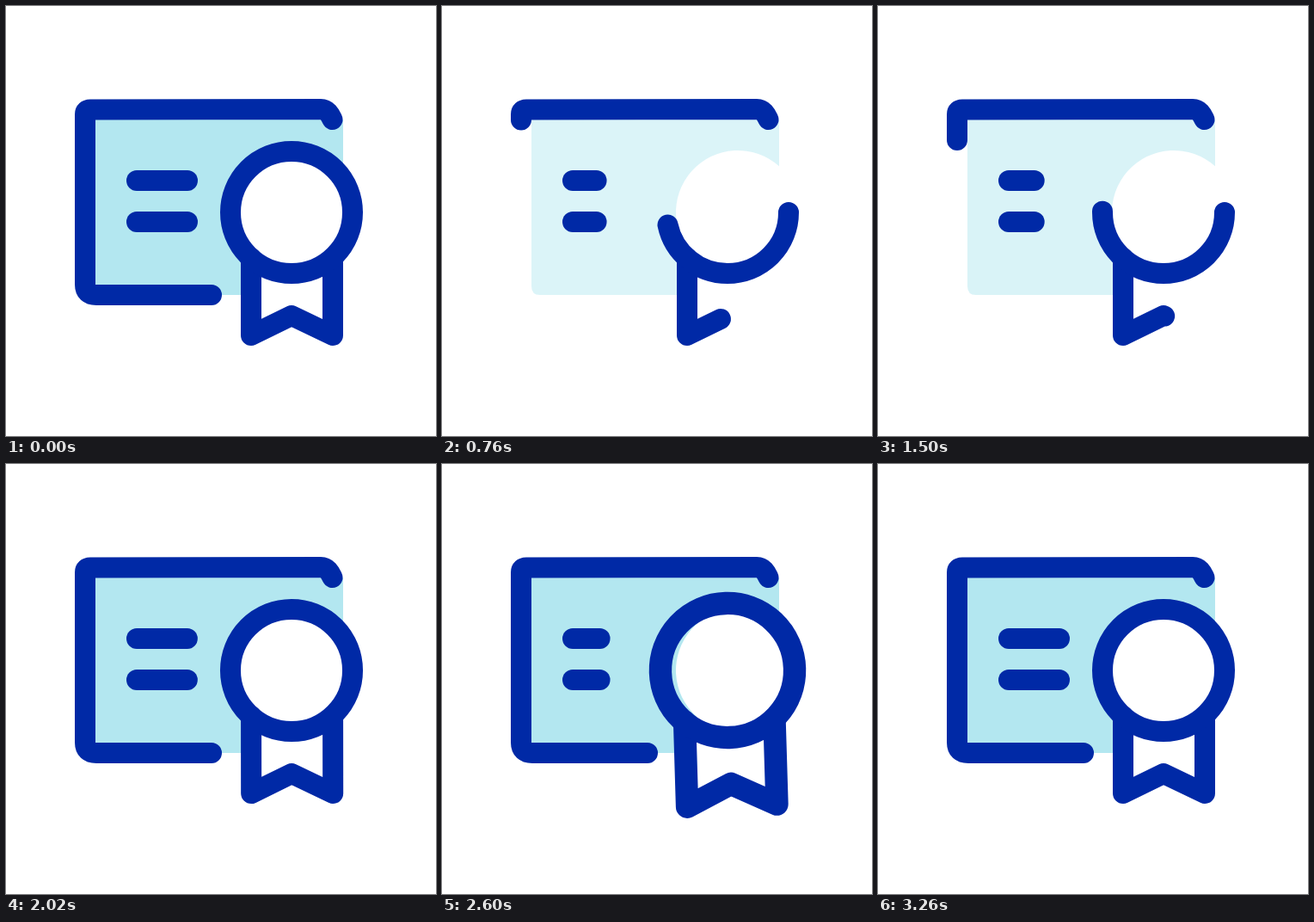
Write an HTML page that moves like this. It is 500 by 500 pixels and loops after 4 s.

```html
<!DOCTYPE html>
<html>
<head>
<meta charset="utf-8">
<style>
  html, body { margin: 0; width: 100%; height: 100%; overflow: hidden; background: #fff; }
  svg { display: block; width: 100%; height: 100%; }
  .ink { fill: none; stroke: #0029a6; stroke-width: 24; stroke-linecap: round; stroke-linejoin: round; }
</style>
</head>
<body>
<svg viewBox="0 0 500 500">
  <path id="paper" fill="#b3e7f0" d="M104 132H392V186.3A72 72 0 1 0 296 293.7V336H114Q104 336 104 326Z"/>
  <g class="ink">
    <path class="trim" pathLength="1" d="M379.5 132C377 127 374 120 366 120L98 120.5Q92 120.5 92 126V324Q92 336 105 336H239"/>
    <path class="line" pathLength="1" d="M152 203H211"/>
    <path class="line" pathLength="1" d="M152 251H211"/>
    <g id="badge">
      <path class="trim" pathLength="1" d="M285 293V383L332 360L380 383V293"/>
      <path class="trim" pathLength="1" d="M403 240A71 71 0 0 1 261 240A71 71 0 0 1 403 240"/>
    </g>
  </g>
</svg>
<script>
const LOOP = 4000;
const paper = document.getElementById('paper');
const badge = document.getElementById('badge');
const trims = document.querySelectorAll('.trim');
const lines = document.querySelectorAll('.line');

// Keyframes as [time, value] pairs, eased in and out
const DRAWN = [[500, 1], [1000, 0], [1250, 0], [1750, 1]];
const LINE = [[2000, 1], [2500, 0.48], [3000, 1]];
const SCALE = [[2000, 1], [2625, 1.1], [3250, 1]];
const SWING = [[2000, 0], [2417, -10], [2833, 10], [3250, 0]];

function valueAt(keys, t) {
  if (t <= keys[0][0]) return keys[0][1];
  for (let i = 1; i < keys.length; i++) {
    const [t0, a] = keys[i - 1], [t1, b] = keys[i];
    if (t < t1) {
      const p = (t - t0) / (t1 - t0);
      return a + (b - a) * p * p * (3 - 2 * p);
    }
  }
  return keys[keys.length - 1][1];
}

function trim(path, amount) {
  path.style.visibility = amount > 0 ? 'visible' : 'hidden';
  path.setAttribute('stroke-dasharray', amount < 1 ? `${amount} 2` : 'none');
}

function draw(t) {
  const drawn = valueAt(DRAWN, t);
  paper.setAttribute('opacity', drawn);
  trims.forEach(path => trim(path, drawn));
  lines.forEach(path => trim(path, drawn * valueAt(LINE, t)));
  badge.setAttribute('transform',
    `translate(332 240) rotate(${valueAt(SWING, t)}) scale(${valueAt(SCALE, t)}) translate(-332 -240)`);
}

const start = performance.now();
function tick() {
  draw((performance.now() - start) % LOOP);
  requestAnimationFrame(tick);
}
tick();
</script>
</body>
</html>
```
